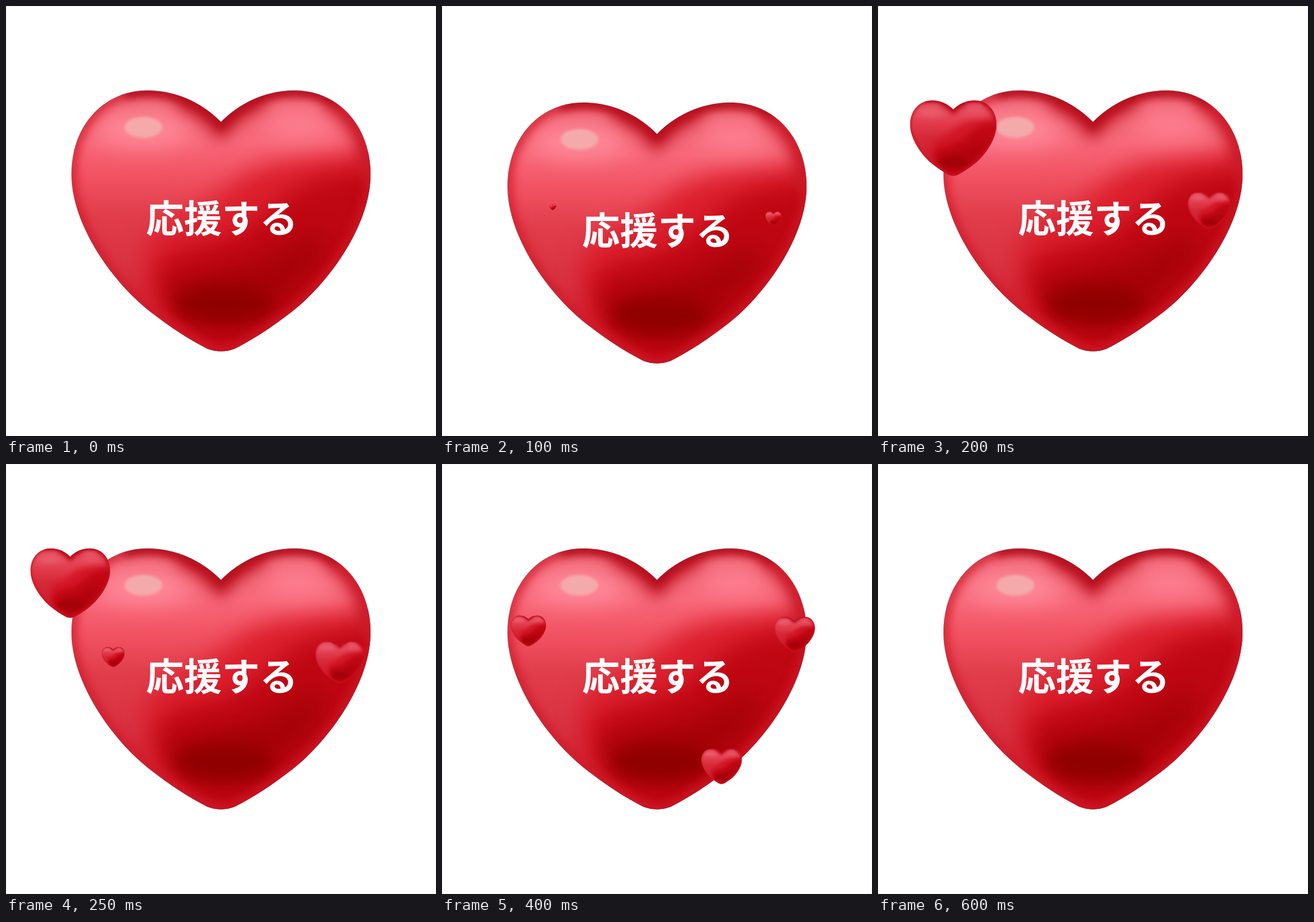
These frames come from a looping animation (748 px wide and 748 px high, 0.65 s). An HTML page:

```html
<!DOCTYPE html>
<html lang="ja">
<head>
<meta charset="utf-8">
<title>応援する</title>
<style>
  html, body { margin: 0; width: 100%; height: 100%; overflow: hidden; background: #fff; }
  svg { display: block; width: 100%; height: 100%; }
  text { font: 700 66px "Noto Sans CJK JP", "Noto Sans CJK", sans-serif; fill: #fff; text-anchor: middle; }
</style>
</head>
<body>
<svg viewBox="0 0 748 748">
  <defs>
    <path id="outline" d="M374,202 C345,172 300,147 246,147 C170,147 114,208 114,293 C114,380 185,480 250,531
      C285,558 315,578 350,596 Q374,605 398,596 C433,578 463,558 498,531 C563,480 634,380 634,293
      C634,208 578,147 502,147 C448,147 403,172 374,202 Z"/>
    <clipPath id="inside"><use href="#outline"/></clipPath>
    <linearGradient id="base" gradientUnits="userSpaceOnUse" x1="0" y1="147" x2="0" y2="600">
      <stop offset="0" stop-color="#ee6675"/>
      <stop offset=".2" stop-color="#f8697a"/>
      <stop offset=".33" stop-color="#f15262"/>
      <stop offset=".48" stop-color="#e13d4a"/>
      <stop offset=".7" stop-color="#d83040"/>
      <stop offset="1" stop-color="#cc1826"/>
    </linearGradient>
    <g id="blurs"></g>
    <g id="heart">
      <g clip-path="url(#inside)">
        <use href="#outline" fill="url(#base)"/>
        <path fill="#dc1f2d" filter="url(#blur20)"
          d="M720,240 C620,262 520,262 460,276 C400,292 385,322 340,350 C290,378 240,395 242,430 L250,490 L300,640 L720,640 Z"/>
        <path fill="#be0712" filter="url(#blur20)"
          d="M720,272 C620,288 545,292 500,322 C455,355 430,390 370,408 C310,426 262,432 260,470 L290,560 L374,620 L720,620 Z"/>
        <path fill="#a60208" filter="url(#blur20)"
          d="M270,490 C330,470 410,462 470,430 C520,400 550,390 558,410 C560,440 500,505 450,535 C410,560 360,570 320,545 Z"/>
        <ellipse cx="380" cy="518" rx="86" ry="32" fill="#900000" filter="url(#blur14)"/>
        <ellipse cx="240" cy="214" rx="84" ry="28" fill="#ff8c9c" filter="url(#blur20)"/>
        <ellipse cx="508" cy="205" rx="66" ry="20" fill="#ff8495" filter="url(#blur20)"/>
        <path fill="none" stroke="#c21c2a" stroke-width="32" filter="url(#blur14)"
          d="M300,160 C332,172 355,188 374,212 C392,188 416,172 448,160"/>
        <path fill="none" stroke="#c81a28" stroke-width="36" filter="url(#blur14)"
          d="M560,158 C610,185 634,235 634,293"/>
        <use href="#outline" fill="none" stroke="#d01a29" stroke-width="18" stroke-opacity=".8" filter="url(#blur8)"/>
        <path fill="none" stroke="#b00c1a" stroke-width="18" filter="url(#blur8)"
          d="M205,152 C218,149 232,147 246,147 C300,147 345,172 374,202 C403,172 448,147 502,147 C530,147 556,153 578,168"/>
      </g>
    </g>
    <g id="spark">
      <use href="#heart"/>
      <use href="#outline" fill="#c00818" fill-opacity=".35"/>
    </g>
  </defs>
  <rect x=".5" y=".5" width="747" height="747" fill="#fff" stroke="#f2f2f2"/>
  <g id="main">
    <use href="#heart"/>
    <use href="#outline" fill="none" stroke="#5a2a30" stroke-opacity=".4" stroke-width=".8"/>
    <ellipse cx="239" cy="211" rx="33" ry="18" fill="#f4a9aa" filter="url(#blur2)"/>
    <text x="375.5" y="394">応援する</text>
  </g>
  <g id="sparks"></g>
</svg>
<script>
  const LOOP = 650, STEP = 50, BOUNCE = 21, HEART_WIDTH = 520;

  // Each small heart swells and shrinks once while it follows a curve: start, bend, end.
  const flights = [
    { born: 98, life: 230, size: 152, path: [[194, 353], [105, 156], [97, 221]] },
    { born: 200, life: 312, size: 66, path: [[195, 362], [171, 272], [113, 288]] },
    { born: 72, life: 443, size: 88, path: [[579, 372], [556, 358], [658, 244]] },
    { born: 300, life: 270, size: 75, path: [[413, 576], [512, 508], [610, 441]] }
  ];

  const byId = id => document.getElementById(id);

  function add(parent, tag, attrs) {
    const node = document.createElementNS("http://www.w3.org/2000/svg", tag);
    for (const name in attrs) node.setAttribute(name, attrs[name]);
    return parent.appendChild(node);
  }

  for (const size of [2, 8, 14, 20]) {
    const filter = add(byId("blurs"), "filter", {
      id: "blur" + size, filterUnits: "userSpaceOnUse", x: 0, y: 0, width: 748, height: 748,
      "color-interpolation-filters": "sRGB"
    });
    add(filter, "feGaussianBlur", { stdDeviation: size });
  }

  const sparks = flights.map(() => add(byId("sparks"), "use", { href: "#spark" }));

  const swell = p => Math.sin(Math.PI * p) ** 0.7;
  const along = ([a, b, c], p) =>
    [0, 1].map(i => (1 - p) ** 2 * a[i] + 2 * p * (1 - p) * b[i] + p * p * c[i]);

  function draw(time) {
    const t = Math.floor(time % LOOP / STEP) * STEP;
    const drop = BOUNCE * Math.max(0, 1 - Math.abs(t - 100) / 100);
    byId("main").setAttribute("transform", `translate(0 ${drop})`);
    flights.forEach(({ born, life, size, path }, i) => {
      const p = (t - born) / life;
      const visible = p > 0 && p < 1;
      sparks[i].setAttribute("display", visible ? "inline" : "none");
      if (!visible) return;
      const [x, y] = along(path, p);
      const scale = size * swell(p) / HEART_WIDTH;
      sparks[i].setAttribute("transform", `translate(${x} ${y}) scale(${scale}) translate(-374 -373.5)`);
    });
  }

  let start;
  function tick(now) {
    start ??= now;
    draw(now - start);
    requestAnimationFrame(tick);
  }
  draw(0);
  requestAnimationFrame(tick);
</script>
</body>
</html>
```
